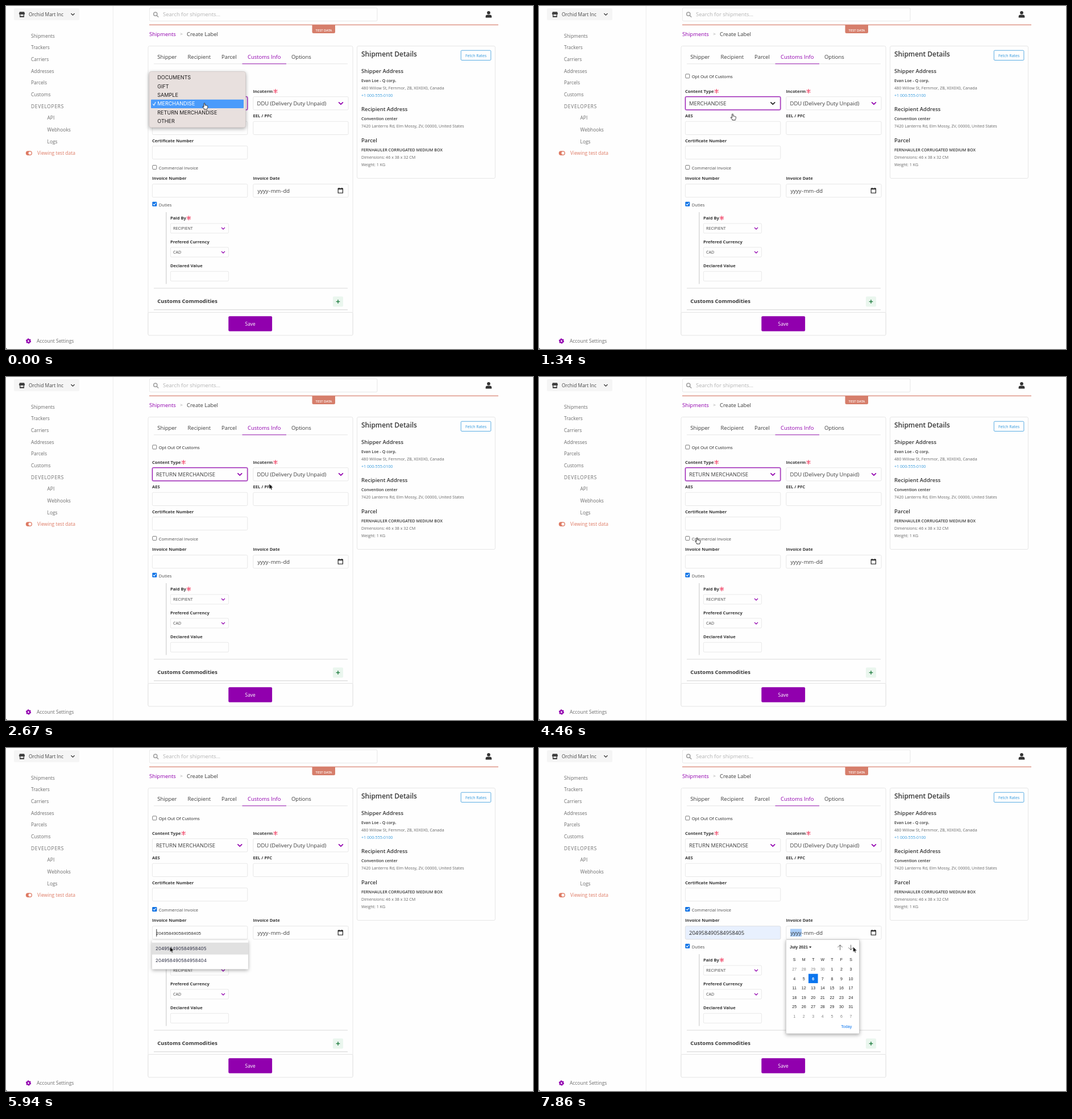
Write an HTML page that moves like this. It is 927 px wide and 604 px high and loops after 8000 ms.

```html
<!DOCTYPE html>
<html lang="en">
<head>
<meta charset="utf-8">
<title>Create label</title>
<style>
html, body { margin: 0; width: 100%; height: 100%; overflow: hidden; background: #fefefe; }
svg { display: block; width: 927px; height: 604px; }
text { font: 9.45px "Open Sans", "Noto Sans", sans-serif; fill: #3c3c3c; }
.side text { font-size: 8.45px; fill: #6c6c6c; }
.label text { font-size: 7.6px; font-weight: 700; fill: #363636; }
.check text { font-size: 7.6px; fill: #4a4a4a; }
.small text { font-size: 7.15px; fill: #666; }
.small .b { font-weight: 600; fill: #363636; }
.head text { font-weight: 600; fill: #363636; }
.mid { text-anchor: middle; }
.field { fill: #fefefe; stroke: #d8d8d8; stroke-width: .6; }
.hover { fill: none; stroke: #b0b0b0; stroke-width: .7; }
.focus { fill: none; stroke: #9100ae; }
.menu text { font: 9.05px Inter, sans-serif; fill: #1d1b1b; }
.menu .on text { fill: #fff; }
.popup text { font: 8px Inter, sans-serif; fill: #2b2d42; }
.cal text { font: 7.1px "Liberation Sans", Arial, sans-serif; fill: #222; }
.cal .out { fill: #858585; }
.cal .bold { font-weight: 700; }
.line { fill: none; stroke-linecap: round; stroke-linejoin: round; }
.shadow { filter: drop-shadow(0 2px 3px #0005); }

/* Everything timed switches hard */
.t { opacity: 0; animation: 8s step-end infinite; }
#menu { animation-name: menu; }
#pick1 { animation-name: pick1; }
#pick2 { animation-name: pick2; }
#before { animation-name: before; }
#after { animation-name: after; }
#focus { animation-name: focus; }
#ticked { animation-name: ticked; }
#certHover { animation-name: certHover; }
#numberHover { animation-name: numberHover; }
#dateHover { animation-name: dateHover; }
#caret { animation-name: caret; }
#preview { animation-name: preview; }
#popup { animation-name: popup; }
#row { animation-name: row; }
#filled { animation-name: filled; }
#year { animation-name: year; }
#calendar { animation-name: calendar; }
#hand { animation-name: hand; }
#beam { animation-name: beam; }
#arrow { animation-name: arrow; }
#cursor { animation: move 8s step-end infinite; }
@keyframes menu { 0% { opacity: 1 } 16.75% { opacity: 0 } }
@keyframes pick1 { 0% { opacity: 1 } 5.625% { opacity: 0 } }
@keyframes pick2 { 5.625%, 14.875% { opacity: 1 } 13%, 16.75% { opacity: 0 } }
@keyframes before { 0% { opacity: 1 } 20.5% { opacity: 0 } }
@keyframes after { 20.5% { opacity: 1 } }
@keyframes focus { 0% { opacity: 1 } 61.375% { opacity: 0 } }
@keyframes ticked { 61.375% { opacity: 1 } }
@keyframes certHover { 22.375% { opacity: 1 } 28% { opacity: 0 } }
@keyframes numberHover { 40.75%, 66.875% { opacity: 1 } 50.125%, 72.375% { opacity: 0 } }
@keyframes dateHover { 85.375%, 92.75% { opacity: 1 } 87.125%, 96.5% { opacity: 0 } }
@keyframes caret { 66.875% { opacity: 1 } 78% { opacity: 0 } }
@keyframes preview { 72.375% { opacity: 1 } 78% { opacity: 0 } }
@keyframes popup { 68.75% { opacity: 1 } 81.75% { opacity: 0 } }
@keyframes row { 72.375% { opacity: 1 } 81.75% { opacity: 0 } }
@keyframes filled { 78% { opacity: 1 } }
@keyframes year { 94.625% { opacity: 1 } }
@keyframes calendar { 96.5% { opacity: 1 } }
@keyframes hand { 0%, 55.75% { opacity: 1 } 22.375%, 66.875% { opacity: 0 } }
@keyframes beam { 22.375%, 40.75%, 66.875% { opacity: 1 } 28%, 50.125%, 72.375% { opacity: 0 } }
@keyframes arrow { 28%, 50.125%, 72.375% { opacity: 1 } 40.75%, 55.75% { opacity: 0 } }
@keyframes move {
  0% { transform: translate(349px, 171px) }
  5.625% { transform: translate(345px, 184px) }
  7.375% { transform: translate(340.5px, 190px) }
  18.625% { transform: translate(343.5px, 193px) }
  20.5% { transform: translate(346px, 203px) }
  22.375% { transform: translate(357px, 250px) }
  24.25% { transform: translate(375px, 256px) }
  26.125% { transform: translate(400px, 252px) }
  28% { transform: translate(432px, 237px) }
  29.875% { transform: translate(453px, 214px) }
  31.625% { transform: translate(462px, 195px) }
  33.375% { transform: translate(463px, 188px) }
  35.25% { transform: translate(392px, 238px) }
  37.125% { transform: translate(272px, 303px) }
  40.75% { transform: translate(284px, 322px) }
  42.625% { transform: translate(296px, 328px) }
  44.5% { transform: translate(300px, 328px) }
  46.375% { transform: translate(296px, 324px) }
  48.25% { transform: translate(288px, 318px) }
  50.125% { transform: translate(281px, 297px) }
  52% { transform: translate(278px, 283px) }
  65% { transform: translate(281px, 298px) }
  66.875% { transform: translate(286px, 323px) }
  70.5% { transform: translate(287px, 331px) }
  72.375% { transform: translate(288px, 346px) }
  74.25% { transform: translate(288.5px, 350px) }
  81.75% { transform: translate(291px, 350px) }
  83.625% { transform: translate(390px, 340px) }
  85.375% { transform: translate(446px, 326px) }
  87.125% { transform: translate(400px, 328px) }
  89% { transform: translate(344px, 327px) }
  92.75% { transform: translate(480px, 327px) }
  94.625% { transform: translate(570px, 325px) }
  96.5% { transform: translate(587px, 325px) }
  98.25% { transform: translate(552.5px, 350px) }
}
</style>
</head>
<body>
<svg viewBox="0 0 927 604">
  <defs>
    <path id="chev" class="line" d="M-3.4 -1.7L0 1.7 3.4 -1.7" stroke-width="1.7"/>
    <path id="star" class="line" d="M0 -3.4V3.4M-3 -1.7L3 1.7M-3 1.7L3 -1.7" stroke="#f14668" stroke-width="1.3"/>
    <rect id="box" x=".5" y=".5" width="7" height="7" rx="1" fill="#fff" stroke="#6d6d6d" stroke-width=".9"/>
    <g id="boxOn"><rect width="8" height="8" rx="1.2" fill="#0b72e7"/><path class="line" d="M1.9 4.1L3.4 5.7 6.2 2.2" stroke="#fff" stroke-width="1.2"/></g>
    <rect id="input" width="167.4" height="23.2" rx="2"/>
    <rect id="smallInput" width="102" height="17" rx="1.5"/>
  </defs>

  <!-- Sidebar -->
  <path d="M188.3 0V604" stroke="#ededed"/>
  <rect x="14" y="4" width="115" height="21" rx="2" fill="#f5f5f5"/>
  <path d="M24 10.2H32L33.2 13.6A1.4 1.4 0 0 1 32 15V19.8H24V15A1.4 1.4 0 0 1 22.8 13.6ZM25.3 15V17.4H30.7V15Z" fill="#3f3f3f" fill-rule="evenodd"/>
  <use href="#chev" transform="translate(117.5 14.8) scale(.78)" stroke="#363636"/>
  <g class="side">
    <text x="40" y="18.2" style="fill:#444">Orchid Mart Inc</text>
    <text x="44" y="55.6">Shipments</text>
    <text x="44" y="76.3">Trackers</text>
    <text x="44" y="97">Carriers</text>
    <text x="44" y="117.7">Addresses</text>
    <text x="44" y="138.4">Parcels</text>
    <text x="44" y="159.1">Customs</text>
    <text x="44" y="179.5" style="font-size:8.3px;letter-spacing:.8px">DEVELOPERS</text>
    <text x="72.5" y="200.4">API</text>
    <text x="72.5" y="221">Webhooks</text>
    <text x="72.5" y="241.8">Logs</text>
    <text x="55" y="262.3" style="fill:#de7a64">Viewing test data</text>
    <text x="54" y="593">Account Settings</text>
  </g>
  <rect x="34.8" y="255.2" width="11.2" height="7.8" rx="3.9" fill="#de7a64"/>
  <circle cx="42.1" cy="259.1" r="2.6" fill="#fefefe"/>
  <g fill="none" stroke="#9100ae"><circle cx="39.5" cy="590" r="2.6" stroke-width="2.2"/><circle cx="39.5" cy="590" r="4" stroke-width="1.3" stroke-dasharray="2.2 1.99"/></g>
  <path d="M0 601.5Q.3 603.7 2.5 604H0Z" fill="#333"/>

  <!-- Top bar -->
  <rect class="field" x="252.4" y="3.2" width="400.6" height="23.2" rx="2"/>
  <g class="line" stroke="#a0a0a0" stroke-width="1.5"><circle cx="262.8" cy="14.2" r="3.1"/><path d="M265.2 16.6L267.8 19.2"/></g>
  <text x="276" y="18.2" style="fill:#b3b3b3">Search for shipments...</text>
  <g fill="#333"><circle cx="849" cy="11.8" r="2.9"/><path d="M843.7 20.4V18.5Q843.7 15.4 846.8 15.4H851.2Q854.3 15.4 854.3 18.5V20.4Z"/></g>
  <rect x="252" y="32.6" width="614" height="1.2" fill="#d67e6b"/>
  <path d="M538.5 33H579V45.5Q579 48 576.5 48H541Q538.5 48 538.5 45.5Z" fill="#d67e6b"/>
  <text class="mid" x="559" y="44.5" style="font-size:5.8px;font-weight:600;fill:#fff">TEST DATA</text>
  <text x="252" y="52.5" style="fill:#9100ae">Shipments</text>
  <text x="306.3" y="52.2" style="font-size:8px;fill:#999">&gt;</text>
  <text x="318" y="52.5">Create Label</text>

  <!-- Form card -->
  <rect x="250" y="70.5" width="360" height="509" rx="2.5" fill="none" stroke="#e6e6e6"/>
  <path d="M260 101.8H601" stroke="#dbdbdb" stroke-width=".7"/>
  <path d="M415.5 101.8H493" stroke="#9100ae" stroke-width=".9"/>
  <text x="266.3" y="93.4">Shipper</text>
  <text x="319.5" y="93.4">Recipient</text>
  <text x="379" y="93.4">Parcel</text>
  <text x="425" y="93.4" style="fill:#9100ae">Customs Info</text>
  <text x="502" y="93.4">Options</text>

  <g class="label">
    <text x="257" y="152.9">Content Type</text>
    <text x="434.5" y="152.9">Incoterm</text>
    <text x="257" y="196.2">AES</text>
    <text x="434.5" y="196.2">EEL / PFC</text>
    <text x="257" y="239.8">Certificate Number</text>
    <text x="257" y="306.3">Invoice Number</text>
    <text x="434.5" y="306.3">Invoice Date</text>
    <text x="289" y="376.3">Paid By</text>
    <text x="289" y="418.2">Prefered Currency</text>
    <text x="289" y="460.1">Declared Value</text>
  </g>
  <use href="#star" x="312.3" y="150"/>
  <use href="#star" x="474" y="150"/>
  <use href="#star" x="321.5" y="373.3"/>

  <g class="check">
    <text x="268.7" y="127" style="fill:#222">Opt Out Of Customs</text>
    <text x="268.7" y="287.5">Commercial Invoice</text>
    <text x="268.7" y="352.5">Duties</text>
  </g>
  <use href="#box" x="257.3" y="119.4"/>
  <use href="#box" x="257.3" y="280"/>
  <use href="#boxOn" x="257.3" y="344.8"/>
  <use id="ticked" class="t" href="#boxOn" x="257.3" y="280"/>

  <g class="field">
    <use href="#input" x="257.4" y="159.7"/>
    <use href="#input" x="434.8" y="159.7"/>
    <use href="#input" x="257.4" y="203.3"/>
    <use href="#input" x="434.8" y="203.3"/>
    <use href="#input" x="257.4" y="246.4"/>
    <use href="#input" x="257.4" y="313.6"/>
    <use href="#input" x="434.8" y="313.6"/>
    <use href="#smallInput" x="289.4" y="383"/>
    <use href="#smallInput" x="289.4" y="425"/>
    <use href="#smallInput" x="289.4" y="467.3"/>
  </g>
  <g class="hover">
    <use id="certHover" class="t" href="#input" x="257.4" y="246.4"/>
    <use id="numberHover" class="t" href="#input" x="257.4" y="313.6"/>
    <use id="dateHover" class="t" href="#input" x="434.8" y="313.6"/>
  </g>
  <g id="focus" class="t focus">
    <use href="#input" x="257.4" y="159.7" stroke-width="2.6" stroke-opacity=".25"/>
    <use href="#input" x="257.4" y="159.7" stroke-width=".9"/>
  </g>
  <g id="before" class="t"><text x="264" y="174.5">MERCHANDISE</text><use href="#chev" x="411.3" y="171.5" stroke="#222"/></g>
  <g id="after" class="t"><text x="264" y="174.5">RETURN MERCHANDISE</text><use href="#chev" x="411.3" y="171.5" stroke="#9100ae"/></g>
  <text x="441.5" y="174.5">DDU (Delivery Duty Unpaid)</text>
  <use href="#chev" x="589" y="171.5" stroke="#9100ae"/>

  <rect id="year" class="t" x="442" y="318.5" width="20" height="13.5" fill="#a9cdf8"/>
  <text y="328.9"><tspan x="442.5">yyyy</tspan><tspan x="462.1">-</tspan><tspan x="465.7">mm</tspan><tspan x="483.9">-</tspan><tspan x="487.5">dd</tspan></text>
  <path d="M584.2 321.2H592.4V329.3H584.2ZM585.9 320V321M590.7 320V321M584 322.5H592.6" fill="none" stroke="#111" stroke-width="1.1"/>

  <path d="M281.8 363V489.5" stroke="#cfcfcf" stroke-width="1.2"/>
  <g class="small">
    <text x="294" y="394" style="fill:#444">RECIPIENT</text>
    <text x="294" y="436" style="fill:#444">CAD</text>
  </g>
  <use href="#chev" transform="translate(382 391.7) scale(.78)" stroke="#9100ae"/>
  <use href="#chev" transform="translate(382 433.7) scale(.78)" stroke="#9100ae"/>

  <path d="M260 497H601M260 534.8H601" stroke="#d9d9d9" stroke-width="1.2"/>
  <text x="266.3" y="522.5" style="font-weight:700;fill:#363636">Customs Commodities</text>
  <rect x="575" y="511.5" width="18" height="18" rx="2" fill="#eaf6ee"/>
  <path d="M584 517.2V523.8M580.7 520.5H587.3" stroke="#2b8249" stroke-width="1.5"/>
  <rect x="250" y="539.5" width="360" height="40.5" rx="2" fill="#fefefe" stroke="#e3e3e3"/>
  <rect x="391.3" y="546.2" width="76.8" height="26.6" rx="2" fill="#9100ae"/>
  <text class="mid" x="429.7" y="562.8" style="font-size:8.4px;fill:#fff">Save</text>

  <!-- Details card -->
  <rect x="617.5" y="70.5" width="243" height="233" rx="2.5" fill="none" stroke="#e6e6e6"/>
  <g class="head">
    <text x="625" y="88.7" style="font-size:11.9px">Shipment Details</text>
    <text x="625" y="118">Shipper Address</text>
    <text x="625" y="185.4">Recipient Address</text>
    <text x="625" y="239.8">Parcel</text>
  </g>
  <rect x="800.3" y="78.2" width="52.6" height="17.3" rx="1.5" fill="#fefefe" stroke="#3298dc" stroke-width=".8"/>
  <g class="small">
    <text class="mid" x="826.6" y="89.5" style="font-size:7px;fill:#3298dc">Fetch Rates</text>
    <text class="b" x="625" y="134">Evan Loe - Q corp.</text>
    <text x="625" y="147.2">480 Willow St, Fernmor, ZB, X0X0X0, Canada</text>
    <text x="625" y="160" style="fill:#3298dc">+1 000-555-0100</text>
    <text class="b" x="625" y="201.3">Convention center</text>
    <text x="625" y="214.3">7420 Lanterns Rd, Elm Mossy, ZV, 00000, United States</text>
    <text class="b" x="625" y="255.8">FERNHAULER CORRUGATED MEDIUM BOX</text>
    <text x="625" y="268.8">Dimensions: 46 x 38 x 32 CM</text>
    <text x="625" y="281.8">Weight: 1 KG</text>
  </g>

  <!-- Content type menu -->
  <g id="menu" class="t menu">
    <rect class="shadow" x="252" y="115.5" width="169.5" height="98.5" rx="3.5" fill="#e8e0de" stroke="#c9c2c0" stroke-width=".6"/>
    <text x="266.3" y="129.3">DOCUMENTS</text>
    <text x="266.3" y="144.7">GIFT</text>
    <text x="266.3" y="160">SAMPLE</text>
    <text x="266.3" y="175.3">MERCHANDISE</text>
    <text x="266.3" y="190.7">RETURN MERCHANDISE</text>
    <text x="266.3" y="206">OTHER</text>
    <path class="line" d="M258.6 172.8L260.2 175 263 169.6" stroke="#222" stroke-width="1.1"/>
    <g id="pick1" class="t on">
      <rect x="255" y="164.8" width="163" height="15.3" rx="1" fill="#4a9bfb"/>
      <text x="266.3" y="175.3">MERCHANDISE</text>
      <path class="line" d="M258.6 172.8L260.2 175 263 169.6" stroke="#fff" stroke-width="1.1"/>
    </g>
    <g id="pick2" class="t on">
      <rect x="255" y="180.1" width="163" height="15.3" rx="1" fill="#5aa3fb"/>
      <text x="266.3" y="190.7">RETURN MERCHANDISE</text>
    </g>
  </g>

  <!-- Invoice number -->
  <text id="preview" class="t" x="264" y="329" style="font:7.9px 'Liberation Sans',Arial,sans-serif;fill:#333">204958490584958405</text>
  <path id="caret" class="t" d="M264.8 319V332" stroke="#222" stroke-width=".9"/>
  <g id="filled" class="t">
    <use href="#input" x="257.4" y="313.6" fill="#e8f0fe" stroke="#d8d8d8" stroke-width=".6"/>
    <text x="264" y="328.9" style="fill:#222">204958490584958405</text>
  </g>
  <g id="popup" class="t popup">
    <rect class="shadow" x="257" y="338.5" width="169" height="51" rx="1" fill="#fff"/>
    <rect id="row" class="t" x="257" y="342.7" width="169" height="21" fill="#e1e1e1"/>
    <text x="263" y="356.2">204958490584958405</text>
    <text x="263" y="377.4">204958490584958404</text>
  </g>

  <!-- Date picker -->
  <g id="calendar" class="t cal">
    <rect class="shadow" x="434.5" y="337.5" width="129" height="165.5" rx="1" fill="#fff" stroke="#c8c8c8" stroke-width=".7"/>
    <text class="bold" x="441" y="353.3">July 2021</text>
    <path d="M475 349.5H479.4L477.2 352.2Z" fill="#222"/>
    <path class="line" d="M529.6 355.5V347M525.8 350.7L529.6 346.9 533.4 350.7M548.6 347V355.5M544.8 351.7L548.6 355.5 552.4 351.7" stroke="#555" stroke-width=".9"/>
    <rect x="474" y="397.7" width="16.6" height="16.4" fill="#0a75ee"/>
    <g id="days" class="mid"></g>
    <text class="mid" x="540.8" y="493.4" style="fill:#0a75ee">Today</text>
  </g>

  <!-- Pointer -->
  <g id="cursor">
    <path id="arrow" class="t" d="M0 0V9.3L2.1 7.4 3.6 10.7 5.1 10.1 3.7 6.9H6.6Z" fill="#000" stroke="#fff" stroke-width=".6"/>
    <path id="hand" class="t" d="M-1 1Q-1 0 0 0T1 1V4Q2 3.2 2.8 4.2 3.7 3.6 4.4 4.6 5.6 4.2 5.8 5.6V7.4Q5.6 9 4.8 9.7V11H-.4V10L-3 6.9Q-3.5 5.7-2.4 5.6L-1 6.8Z" fill="#fff" stroke="#111" stroke-width=".85" stroke-linejoin="round"/>
    <path id="beam" class="t" d="M-1.8 -5Q0 -5 0 -4 0 -5 1.8 -5M0 -4V4M-1.8 5Q0 5 0 4 0 5 1.8 5" fill="none" stroke="#222" stroke-width=".9"/>
  </g>
</svg>
<script>
const days = document.getElementById('days');

function cell(label, column, y, style) {
  const text = document.createElementNS('http://www.w3.org/2000/svg', 'text');
  text.textContent = label;
  text.setAttribute('x', 449.2 + column * 16.55);
  text.setAttribute('y', y);
  text.setAttribute('class', style);
  days.append(text);
  return text;
}

[...'SMTWTFS'].forEach((name, i) => cell(name, i, 374.8, ''));
for (let i = 0; i < 42; i++) {
  const date = new Date(2021, 5, 27 + i);
  const inMonth = date.getMonth() === 6;
  const text = cell(date.getDate(), i % 7, 392 + Math.floor(i / 7) * 16.5, inMonth ? '' : 'out');
  if (inMonth && date.getDate() === 6) text.style.cssText = 'fill:#fff;font-weight:700';
}
</script>
</body>
</html>
```
